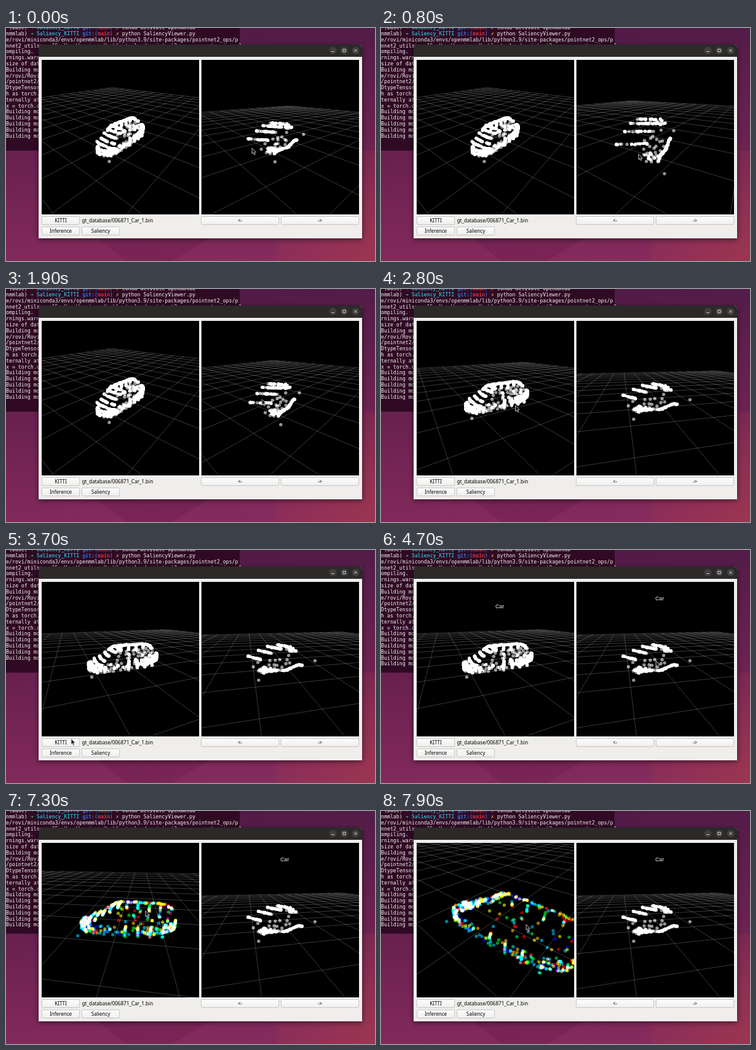
Write an HTML page with a canvas that moves like this. It is 600x380 px and loops after 8 s.

```html
<!DOCTYPE html>
<html lang="en">
<head>
<meta charset="utf-8">
<title>Point cloud viewer</title>
<style>
html, body { margin: 0; width: 100%; height: 100%; overflow: hidden; background: #5c2150; }
canvas { display: block; width: 600px; height: 380px; }
</style>
</head>
<body>
<canvas id="stage" width="600" height="380"></canvas>
<script>
const ctx = document.getElementById('stage').getContext('2d');
const LOOP = 8000, STEP = 100, RAD = Math.PI / 180, NEAR = .2;
const FOCAL = 128 / Math.tan(30 * RAD);
const LABEL_ON = 4200, TINT_ON = 5700, LABEL_OFF = 6500;
const MONO = '8.25px "DejaVu Sans Mono", monospace';
const UI = '8.05px "Noto Sans", sans-serif';
const CHAR = 4.966, ROW = 9.8;

let seed = 7;
const random = () => (seed = (seed * 16807) % 2147483647) / 2147483647;
const spread = amount => (random() + random() - 1) * amount;
const mix = (a, b, k) => a + (b - a) * k;
const clamp = v => Math.min(1, Math.max(0, v));
const smooth = k => k * k * (3 - 2 * k);
const linear = k => k;
const signedPow = (v, p) => Math.sign(v) * Math.abs(v) ** p;
const pick = list => list[Math.floor(random() * list.length)];

// A track starts at a pose and makes moves, each lasting `span` and done at `end`.
const move = (end, span, ...pose) => ({ end, span, pose });
function poseAt({ start, moves, ease }, time) {
  return moves.reduce((pose, m) => {
    const k = ease(clamp((time - m.end + m.span) / m.span));
    return pose.map((v, i) => mix(v, m.pose[i], k));
  }, start);
}

// Camera poses: heading, elevation, distance
const leftCamera = { ease: k => k ** 1.7, start: [-4.5, 27, 10], moves: [
  move(2900, 500, 24, 16.5, 9),
  move(7700, 1100, 86, 37, 5)
] };
const rightCamera = { ease: linear, start: [5, 17.5, 10], moves: [
  move(600, 600, -12, 19, 7.5),
  move(1300, 300, -24, 20, 4.7),
  move(1900, 500, -3.5, 21, 10),
  move(2400, 500, 32, 16, 10)
] };
const cursorTrack = { ease: smooth, start: [400, 196], moves: [
  move(1300, 1300, 428, 210), move(1900, 500, 416, 180), move(2500, 500, 243, 196),
  move(2900, 400, 214, 189), move(3900, 800, 86, 330), move(4700, 600, 447, 181),
  move(5700, 500, 149, 331), move(6500, 600, 183, 160), move(7700, 900, 258, 165),
  move(7900, 100, 236, 185)
] };

// Clouds are in car axes: along (front is negative), across (far side is positive), up.
function scan(count, place, jitter = .03) {
  return Array.from({ length: count }, () => ({
    pos: place(random()).map(v => v + spread(jitter)),
    hue: pick([0, 48, 60, 188, 195, 240, 130])
  }));
}

const roofHeight = along => .78 * smooth(clamp((along + 1.8) / 1.9)) - .3 * clamp((along - 2) / .8) ** 2;

function bodyRing(height) {
  return u => {
    const angle = Math.PI * (.8 + 1.18 * u ** 1.15);
    const along = .35 + 2.4 * signedPow(Math.cos(angle), .6);
    return [along, .7 * signedPow(Math.sin(angle), .6), height + .25 * clamp((along - 1) / 1.7)];
  };
}

function denseCar() {
  const cloud = [];
  for (let level = 0; level < 4; level++) cloud.push(...scan(62, bodyRing(-.45 + level * .13), .05));
  for (let ring = 0; ring < 5; ring++) {
    const along = -1.65 + ring * .38;
    cloud.push(...scan(25 - ring * 2, u => {
      const across = mix(-.6 + ring * .07, .9, u);
      return [along + .15 * across * across, across, roofHeight(along)];
    }));
  }
  cloud.push(...scan(62, u => {
    const along = mix(-.6, 2.8, u);
    return [along, .72 - .3 * u * u, roofHeight(along)];
  }, .06));
  for (let post = 0; post < 4; post++) {
    const along = .3 + post * .6;
    cloud.push(...scan(6, u => [along, .58, mix(.35, .7, u)]));
    cloud.push(...scan(12, u => [along, -.66, mix(-.6, .05, u)]));
  }
  cloud.push(...scan(40, u => [mix(-.3, 2.6, u), spread(.6), mix(-.2, .6, random())], .1));
  cloud.push(...scan(1, () => [-2.1, -.75, -.6], 0));
  return cloud;
}

function sparseCar() {
  const cloud = [];
  for (let ring = 0; ring < 4; ring++) {
    cloud.push(...scan(22, u => {
      const across = mix(-.15, 1.25, u);
      return [.8 - .8 * ring - .35 * across, across, .85 - .07 * ring * ring];
    }));
  }
  cloud.push(...scan(60, u => [mix(-1.7, 1.65, u), -.6, -.6 + .1 * Math.sin(u * 9)], .06));
  cloud.push(...scan(24, u => [mix(-1.75, -.7, u), mix(0, -.6, random()), -.5], .16));
  cloud.push(...scan(14, u => [mix(.6, 1.3, u), mix(-.4, .7, random()), .6], .2));
  cloud.push(...scan(14, u => [mix(-2.3, 1.2, u), spread(.9), mix(-.6, .2, random())], .15));
  cloud.push(...scan(1, () => [2.9, -.6, -.4], 0), ...scan(1, () => [-2.1, -1, -.8], 0));
  return cloud;
}

const views = [
  { x: 58, w: 256, camera: leftCamera, turn: 42, cloud: denseCar(), label: [186, 95.3], colored: true },
  { x: 317.5, w: 256.5, camera: rightCamera, turn: 28, cloud: sparseCar(), label: [446, 81.5] }
];

function makeEye(view, time) {
  const [heading, elevation, distance] = poseAt(view.camera, time);
  const sinE = Math.sin(elevation * RAD), cosE = Math.cos(elevation * RAD);
  return {
    look([x, y, z], turn) {
      const a = (heading + turn) * RAD, s = Math.sin(a), c = Math.cos(a);
      const side = x * s - y * c, ahead = x * c + y * s;
      return [side, ahead * sinE + z * cosE, distance + ahead * cosE - z * sinE];
    },
    screen([side, up, depth]) {
      return [view.x + view.w / 2 + FOCAL * side / depth, 178 - FOCAL * up / depth];
    }
  };
}

function clipNear(p, q) {
  if (p[2] >= NEAR) return p;
  const k = (NEAR - p[2]) / (q[2] - p[2]);
  return p.map((v, i) => mix(v, q[i], k));
}

function drawGrid(eye) {
  const size = 20;
  ctx.strokeStyle = 'rgba(255,255,255,.3)';
  ctx.lineWidth = .75;
  ctx.beginPath();
  for (let i = -size; i <= size; i += 2) {
    for (const [from, to] of [[[i, -size, 0], [i, size, 0]], [[-size, i, 0], [size, i, 0]]]) {
      const a = eye.look(from, 45), b = eye.look(to, 45);
      if (a[2] < NEAR && b[2] < NEAR) continue;
      ctx.moveTo(...eye.screen(clipNear(a, b)));
      ctx.lineTo(...eye.screen(clipNear(b, a)));
    }
  }
  ctx.stroke();
}

function disc(x, y, r, color) {
  ctx.fillStyle = color;
  ctx.beginPath();
  ctx.arc(x, y, r, 0, 7);
  ctx.fill();
}

function drawView(view, time) {
  const eye = makeEye(view, time);
  ctx.save();
  ctx.beginPath();
  ctx.rect(view.x, 52, view.w, 252);
  ctx.clip();
  ctx.fillStyle = '#000';
  ctx.fillRect(view.x, 52, view.w, 252);
  drawGrid(eye);
  ctx.globalCompositeOperation = 'lighter';
  ctx.globalAlpha = .58;
  const tinted = view.colored && time >= TINT_ON;
  for (const { pos, hue } of view.cloud) {
    const p = eye.look(pos, view.turn);
    if (p[2] > NEAR) disc(...eye.screen(p), 2.65, tinted ? `hsl(${hue} 100% 50%)` : '#fff');
  }
  ctx.restore();
  const labelled = time >= LABEL_ON && !(view.colored && time >= LABEL_OFF);
  if (labelled) text('Car', ...view.label, '#f4f4f4', '8.8px "Liberation Sans", sans-serif');
}

function text(str, x, y, color, font, align = 'left') {
  ctx.font = font;
  ctx.fillStyle = color;
  ctx.textAlign = align;
  ctx.fillText(str, x, y);
}

function shape(color, points) {
  ctx.fillStyle = color;
  ctx.beginPath();
  points.forEach(p => ctx.lineTo(...p));
  ctx.closePath();
  ctx.fill();
}

function gradient(x0, y0, x1, y1, ...colors) {
  const g = ctx.createLinearGradient(x0, y0, x1, y1);
  colors.forEach((color, i) => g.addColorStop(i / (colors.length - 1), color));
  return g;
}

function drawDesktop() {
  ctx.fillStyle = gradient(300, 0, 330, 380, '#501b47', '#6a2150', '#852b5d');
  ctx.fillRect(0, 0, 600, 380);
  shape('rgba(60,10,50,.15)', [[150, 343], [330, 343], [270, 380], [195, 380]]);
  ctx.fillStyle = gradient(470, 260, 600, 380, 'rgba(165,58,75,0)', 'rgba(165,58,75,.7)');
  ctx.fillRect(440, 200, 160, 180);
}

const prompt = [
  ['➜', 8, '#33c07c'], ['Saliency_KITTI', 10, '#2aa7b8'], ['git:(', 25, '#2a6fcf'],
  ['main', 30, '#d0303a'], [')', 34, '#2a6fcf'], ['✗', 36, '#d8a23a']
];
const output = [
  'e/rovi/miniconda3/envs/openmmlab/lib/python3.9/site-packages/pointnet2_ops/p',
  'nnet2_utils.py:15: UserWarning: Unable to load pointnet2_ops cpp extension. J',
  'ompiling.', 'rnings.warn', 'size of dat', 'Building mo', 'e/rovi/Rovi', '/pointnet2/',
  'DtypeTensor', 'h as torch.', 'ternally at', 'x = torch.c'
];

function drawPrompt(y, head, command) {
  text(head, 0, y, '#f2f2f2', MONO);
  for (const [str, col, color] of prompt) text(str, col * CHAR, y, color, 'bold ' + MONO);
  text(command, 38 * CHAR, y, '#f2f2f2', MONO);
}

function drawTerminal(time) {
  ctx.fillStyle = '#300a24';
  ctx.fillRect(0, 0, 380, 200);
  const top = 12;
  drawPrompt(top - ROW, ' (base)', 'conda activate openmmlab');
  drawPrompt(top, 'nmmlab)', 'python SaliencyViewer.py');
  const builds = Array(time >= LABEL_ON ? 6 : 5).fill('Building mo');
  [...output, ...builds].forEach((row, i) => text(row, 0, top + (i + 1) * ROW, '#f2f2f2', MONO));
}

function button(label, x, y, w) {
  ctx.fillStyle = gradient(0, y, 0, y + 14, '#fdfdfd', '#efeeed');
  ctx.strokeStyle = '#bdb9b5';
  ctx.lineWidth = .8;
  ctx.beginPath();
  ctx.roundRect(x + .4, y + .4, w - .8, 13.2, 1.8);
  ctx.fill();
  ctx.stroke();
  text(label, x + w / 2, y + 9.7, '#000', UI, 'center');
}

function panel(height, color) {
  ctx.fillStyle = color;
  ctx.beginPath();
  ctx.roundRect(53, 27, 526, height, [5, 5, 0, 0]);
  ctx.fill();
}

function drawWindow() {
  ctx.save();
  ctx.shadowColor = 'rgba(0,0,0,.55)';
  ctx.shadowBlur = 9;
  ctx.shadowOffsetY = 2;
  panel(316, '#efeeec');
  ctx.restore();
  panel(20, '#2b2a29');
  for (let i = 0; i < 3; i++) disc(531.5 + 18.5 * i, 36.7, 6, '#403f3e');
  ctx.strokeStyle = '#e8e8e8';
  ctx.lineWidth = .9;
  ctx.stroke(new Path2D('M529.3 38.5h4.4M547.9 34.6h4.2v4.2h-4.2zM566.4 34.6l4.2 4.2m0-4.2l-4.2 4.2'));
  button('KITTI', 58, 307, 62);
  button('Inference', 58, 324, 62);
  button('Saliency', 123, 324, 62);
  button('<-', 317, 307, 127);
  button('->', 447, 307, 127);
  text('gt_database/006871_Car_1.bin', 123.5, 316.7, '#000', UI);
}

const arrow = new Path2D('M0 0V9.2L2.1 7.4L3.6 10.8L5.2 10.1L3.8 6.8L6.6 6.5Z');

function drawCursor(time) {
  ctx.save();
  ctx.translate(...poseAt(cursorTrack, time));
  ctx.fillStyle = '#1a1a1a';
  ctx.fill(arrow);
  ctx.strokeStyle = '#d8d8d8';
  ctx.lineWidth = .8;
  ctx.stroke(arrow);
  ctx.restore();
}

function frame() {
  const time = Math.floor(performance.now() % LOOP / STEP) * STEP;
  drawDesktop();
  drawTerminal(time);
  drawWindow();
  views.forEach(view => drawView(view, time));
  drawCursor(time);
  requestAnimationFrame(frame);
}
frame();
</script>
</body>
</html>
```
